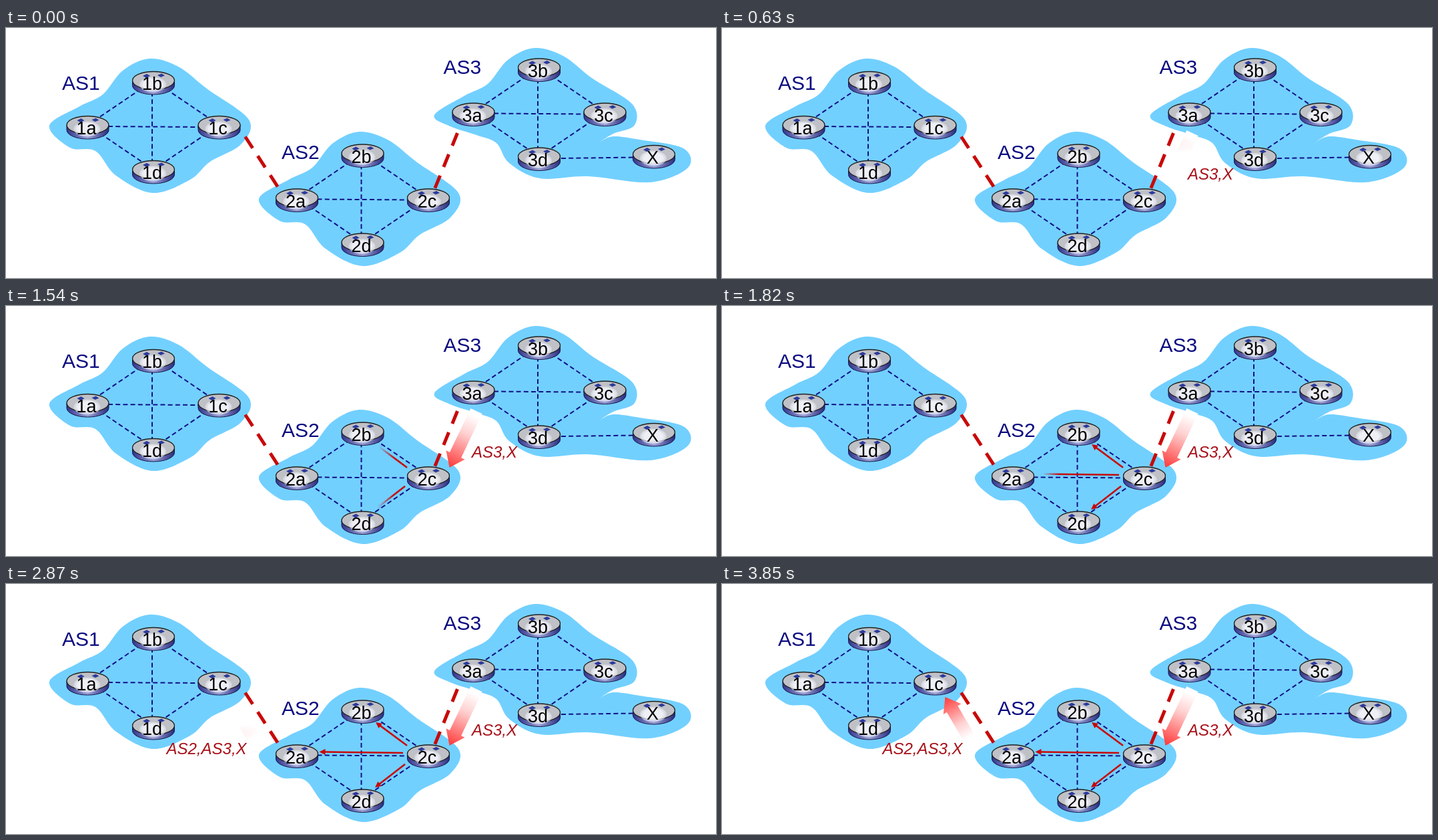
Write an HTML page that moves like this. It is 1064 px wide and 376 px high and loops after 3920 ms.

```html
<!DOCTYPE html>
<html lang="en">
<head>
<meta charset="utf-8">
<title>Path advertisement</title>
<style>
html, body { margin: 0; width: 100%; height: 100%; overflow: hidden; background: #fff; }
svg { display: block; width: 100%; height: 100%; }
text { font-family: "Liberation Sans", Arial, sans-serif; }
.area { fill: #72d0ff; }
.link { stroke: #10108a; stroke-width: 2; stroke-dasharray: 7 4.2; }
.border { stroke: #c80808; stroke-width: 5; stroke-dasharray: 20.5 14; }
.title { font-size: 30px; fill: #0a0a80; }
.name { font-size: 27px; text-anchor: middle; }
.path { font-size: 24px; font-style: italic; fill: #a81018; }
.hop { stroke: #c80808; stroke-width: 2.6; }
.tip { fill: #c80808; }
</style>
</head>
<body>
<svg id="stage" viewBox="0 0 1064 376">
  <defs>
    <linearGradient id="side">
      <stop offset="0" stop-color="#30348c"/>
      <stop offset=".5" stop-color="#9aa0d4"/>
      <stop offset="1" stop-color="#282c80"/>
    </linearGradient>
    <radialGradient id="glow">
      <stop offset=".7" stop-color="#f4f5fb" stop-opacity=".9"/>
      <stop offset="1" stop-color="#e6e8f4" stop-opacity=".5"/>
    </radialGradient>
    <g id="router">
      <path d="M-31.5 0V7.500A31.500 13.500 0 0 0 31.500 7.500V0Z" fill="url(#side)" stroke="#15174a"/>
      <ellipse rx="31.500" ry="13.500" fill="#bfc1c6" stroke="#202020" stroke-width="1.300"/>
      <path d="M-16 -7l6 -3 5 3 -6 3ZM6 -8l6 -2.500 5 3 -6 2.500Z" fill="#2c3a9c"/>
      <ellipse cx="-1" cy="6" rx="20" ry="11.500" fill="url(#glow)"/>
    </g>
  </defs>
</svg>
<script>
const LOOP = 3920, STEP = 70;
const stage = document.getElementById('stage');
const defs = stage.querySelector('defs');
const wipes = [];

function add(tag, attrs, parent = stage, text = '') {
  const el = document.createElementNS('http://www.w3.org/2000/svg', tag);
  for (const k in attrs) el.setAttribute(k, attrs[k]);
  el.textContent = text;
  parent.appendChild(el);
  return el;
}

const line = (cls, [x1, y1], [x2, y2], parent) =>
  add('line', { class: cls, x1, y1, x2, y2 }, parent);
const label = (cls, x, y, text, parent) => add('text', { class: cls, x, y }, parent, text);
const move = (pts, dx, dy) => pts.map(([x, y]) => [x + dx, y + dy]);

function gradient(id, [x1, y1], [x2, y2], stops) {
  const el = add('linearGradient', { id, gradientUnits: 'userSpaceOnUse', x1, y1, x2, y2 }, defs);
  for (const [offset, color] of stops) add('stop', { offset, 'stop-color': color }, el);
  return el;
}

// Closed smooth curve through the points; a repeated point makes a cusp.
function blob(pts) {
  const n = pts.length, at = i => pts[(i + n) % n];
  let d = 'M' + pts[0];
  for (let i = 0; i < n; i++) {
    const [a, b, c, e] = [at(i - 1), at(i), at(i + 1), at(i + 2)];
    const p = [0, 1].map(k => b[k] + (c[k] - a[k]) / 6);
    const q = [0, 1].map(k => c[k] - (e[k] - b[k]) / 6);
    d += `C${p} ${q} ${c}`;
  }
  add('path', { class: 'area', d });
}

const upper = [[302, 92], [258, 58], [215, 46], [175, 64], [145, 100], [110, 118], [65, 147]];
const lower = [[96, 180], [134, 185], [165, 222], [220, 248], [276, 228], [306, 201], [352, 175], [364, 138]];
const tail = [
  [666, 148], [705, 161], [735, 173], [754, 203], [800, 226], [872, 223], [965, 232], [1022, 210],
  [1015, 181], [950, 168], [910, 163], [889, 172], [889, 172], [910, 159], [942, 146], [938, 114]
];

// Four routers a to d sit on a diamond, clockwise from the left.
const spots = [2, 3, 4, 5].map(q => {
  const angle = q * Math.PI / 2;
  return [221 + 98.5 * Math.cos(angle), 146 + 67 * Math.sin(angle)];
});
const cross = [[[153, 148], [290, 149]], [[219, 96], [219, 202]]];
const offsets = [[0, 0], [313.5, 109.5], [578, -19.5]];

function router([x, y], name) {
  add('use', { href: '#router', x, y });
  label('name', x - 2, y + 14, name);
}

function drawCluster([dx, dy], i) {
  const at = move(spots, dx, dy);
  at.forEach((p, k) => line('link', p, at[(k + 1) % 4]));
  for (const pair of cross) line('link', ...move(pair, dx, dy));
  if (i === 2) line('link', [832, 196], [942, 194.5]);
  at.forEach((p, k) => router(p, i + 1 + 'abcd'[k]));
}

function drawNetwork() {
  const cloud = [...upper, ...lower];
  blob(cloud);
  blob(move(cloud, 314, 110));
  blob([...move(upper, 577, -16), ...tail]);
  offsets.forEach(drawCluster);
  router([971, 190], 'X');
  line('border', [358.5, 163.5], [408, 240]);
  line('border', [676.5, 158], [642, 243]);
  label('title', 84, 93, 'AS1');
  label('title', 413, 197, 'AS2');
  label('title', 655.5, 69, 'AS3');
}

// Group revealed along one axis, behind a soft edge.
function wipe(axis, from, to, start, dur) {
  const id = 'w' + wipes.length, soft = 24;
  const grad = gradient(id + 'g', [0, 0], [0, 0], [[0, '#fff'], [1, '#000']]);
  const box = { x: 0, y: 0, width: 1064, height: 376 };
  const mask = add('mask', { id, maskUnits: 'userSpaceOnUse', ...box }, defs);
  add('rect', { ...box, fill: `url(#${id}g)` }, mask);
  const dir = Math.sign(to - from), margin = 4 * dir;
  wipes.push({
    grad, axis, start, dur,
    from: from - margin, length: to - from + 2 * margin + soft * dir, soft: soft * dir
  });
  return add('g', { mask: `url(#${id})` });
}

// Point at a distance back from tip b and sideways from the axis a to b.
function along([ax, ay], [bx, by]) {
  const len = Math.hypot(bx - ax, by - ay);
  const ux = (bx - ax) / len, uy = (by - ay) / len;
  return (back, side) => [bx - ux * back - uy * side, by - uy * back + ux * side];
}

function thinArrow(a, b, start, dur) {
  const group = wipe('x', a[0], b[0], start, dur);
  const p = along(a, b);
  line('hop', a, p(6, 0), group);
  add('polygon', { class: 'tip', points: [b, p(9, 4.5), p(9, -4.5)].join(' ') }, group);
}

function bigArrow(a, b, start) {
  const group = wipe('y', a[1], b[1], start, 250);
  const id = 'fade' + start;
  gradient(id, a, b, [[0.08, '#fff'], [0.4, '#ffd0d0'], [1, '#ff3838']]);
  const p = along(a, b), len = Math.hypot(b[0] - a[0], b[1] - a[1]);
  const half = [[0, 0], [21, 15.5], [21, 9.5], [len, 9.5]];
  const points = [...half.map(([d, s]) => p(d, s)), ...half.reverse().map(([d, s]) => p(d, -s))];
  add('polygon', { points: points.join(' '), fill: `url(#${id})` }, group);
}

function pathLabel(x, y, text, start) {
  const width = 13.4 * text.length;
  label('path', x, y, text, wipe('x', x, x + width, start, 280));
}

function drawMessages() {
  pathLabel(698, 228, 'AS3,X', 350);
  bigArrow([705, 158], [664.5, 243], 560);
  thinArrow([601, 243], [554, 208], 1400, 240);
  thinArrow([598, 271], [553, 306], 1400, 240);
  thinArrow([595, 254], [469.5, 252.5], 1610, 280);
  pathLabel(240.5, 256, 'AS2,AS3,X', 2590);
  bigArrow([373, 236], [334.5, 170], 2800);
}

function update(t) {
  for (const { grad, axis, from, length, soft, start, dur } of wipes) {
    const p = Math.min(1, Math.max(0, (t - start) / dur));
    const front = from + length * p;
    grad.setAttribute(axis + 1, front - soft);
    grad.setAttribute(axis + 2, front);
  }
}

drawNetwork();
drawMessages();
const begin = performance.now();
function tick() {
  const t = (performance.now() - begin) % LOOP;
  update(Math.floor(t / STEP) * STEP);
  requestAnimationFrame(tick);
}
tick();
</script>
</body>
</html>
```
